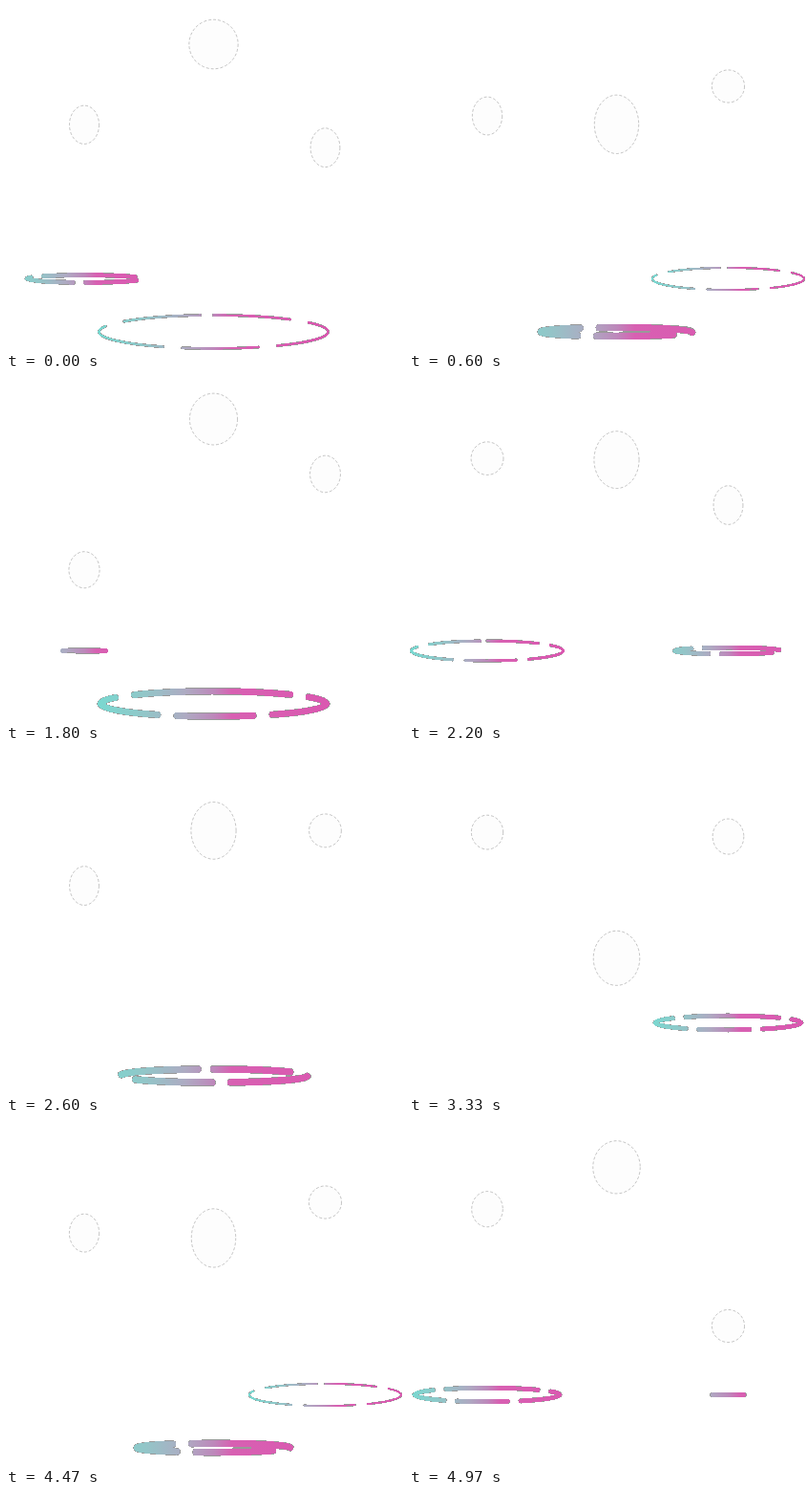
Write an HTML page that moves like this. It is 416x360 px and loops after 5000 ms.

```html
<!DOCTYPE html>
<html lang="en">
<head>
<meta charset="utf-8">
<title>Bouncing balls</title>
<style>
  html, body { margin: 0; width: 100%; height: 100%; overflow: hidden; background: #fff; }
  svg { display: block; width: 416px; height: 360px; }
</style>
</head>
<body>
<svg id="stage" viewBox="0 0 416 360">
  <defs>
    <linearGradient id="tint" gradientUnits="userSpaceOnUse" x1="-120" x2="120" y1="0" y2="0">
      <stop offset="0" stop-color="#7ad8d0"/>
      <stop offset=".2" stop-color="#92c6c8"/>
      <stop offset=".38" stop-color="#aeaac2"/>
      <stop offset=".5" stop-color="#bd88bb"/>
      <stop offset=".58" stop-color="#d860b2"/>
      <stop offset="1" stop-color="#da58b0"/>
    </linearGradient>
  </defs>
</svg>
<script>
const LOOP = 5000;
const PERIOD = 2900 / 3;
const FALL = 462;      // time between apex and floor
const DROP = 195;
const FADE_END = 60;   // the ring is gone this long after the apex

// apex: first moment at which the ball is at its highest point
const balls = [
  { x: 82, top: 84, floor: 285.5, scale: 0.664, apex: 314 },
  { x: 334.5, top: 84, floor: 285.5, scale: 0.664, apex: 602 },
  { x: 217.5, top: 40, floor: 341, scale: 1, apex: -17 }
];

const stage = document.getElementById('stage');
const clamp = v => Math.min(1, Math.max(0, v));

function add(parent, name, attrs) {
  const node = document.createElementNS('http://www.w3.org/2000/svg', name);
  return parent.appendChild(set(node, attrs));
}

function set(node, attrs) {
  for (const key in attrs) node.setAttribute(key, attrs[key]);
  return node;
}

for (const ball of balls) {
  ball.ring = add(stage, 'g', {
    transform: `translate(${ball.x} ${ball.floor}) scale(${ball.scale})`,
    fill: 'none', 'stroke-linecap': 'round', 'stroke-dasharray': '80 20',
    'shape-rendering': 'crispEdges'
  });
  ball.edge = add(ball.ring, 'path', { stroke: '#555', 'stroke-opacity': 0.6 });
  ball.band = add(ball.ring, 'path', { stroke: 'url(#tint)' });
  ball.body = add(stage, 'ellipse', {
    cx: ball.x, fill: '#fdfdfd', stroke: '#888', 'stroke-width': 0.5, 'stroke-dasharray': '3 2'
  });
}

function drawBall(ball, depth) {
  const stretch = Math.sqrt(depth * (1 - depth));
  set(ball.body, {
    cy: ball.top + DROP * ball.scale * depth,
    rx: ball.scale * (25.7 - 5 * stretch),
    ry: ball.scale * (25.7 + 10 * stretch)
  });
}

function drawRing(ball, phase, depth) {
  const visible = phase > -475 && phase < FADE_END;
  ball.ring.style.display = visible ? '' : 'none';
  if (!visible) return;
  const rx = phase < 0 ? 120 - 95 * depth : 120;
  const ry = 0.5 + 17 * clamp((phase + 455) / 455);
  const width = 7 * clamp((90 - phase) / 220);
  const d = `M0 ${-ry}A${rx} ${ry} 0 0 1 0 ${ry}A${rx} ${ry} 0 0 1 0 ${-ry}`;
  set(ball.edge, { d, 'stroke-width': width + 0.9 });
  set(ball.band, { d, 'stroke-width': width });
}

function render(time) {
  for (const ball of balls) {
    const half = PERIOD / 2;
    const phase = (time - ball.apex + half + PERIOD) % PERIOD - half;
    const depth = clamp(Math.abs(phase) / FALL) ** 3;
    drawBall(ball, depth);
    drawRing(ball, phase, depth);
  }
}

const start = performance.now();
function tick() {
  render((performance.now() - start) % LOOP);
  requestAnimationFrame(tick);
}
tick();
</script>
</body>
</html>
```
